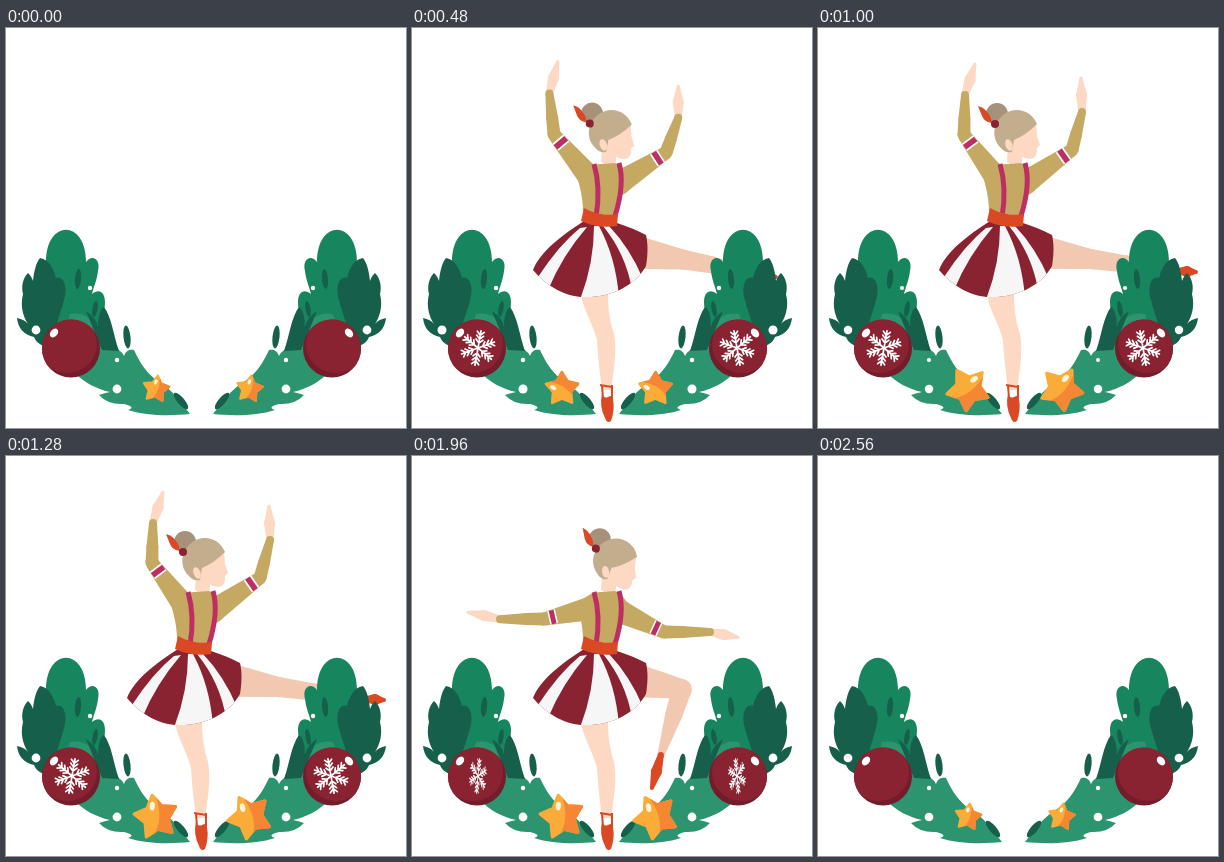
Recreate the animation shown at these times as an HTML page with a canvas. Size 400 by 400 pixels, loop 2.6 s.

```html
<!DOCTYPE html>
<html lang="en">
<head>
<meta charset="utf-8">
<title>Dancer and wreath</title>
<style>
html, body { margin: 0; width: 100%; height: 100%; overflow: hidden; background: #fff; }
canvas { display: block; width: 100vmin; height: 100vmin; }
</style>
</head>
<body>
<canvas id="stage" width="400" height="400"></canvas>
<script>
const ctx = document.getElementById('stage').getContext('2d');
const LOOP = 2600, TAU = Math.PI * 2, DEG = Math.PI / 180;
const SKIN = '#fdd8c3', SKIN_SHADE = '#f2c8b0', GOLD = '#c5a963', MAGENTA = '#bd2f62';
const RED = '#8a2331', ORANGE = '#db4924', BRIGHT = '#17855d', DARK = '#165f4a', LIGHT = '#2c9570';

const shapes = {
  bright: 'M40 234C40 191 80 191 80 234C86 226 95 231 92 243C91 252 88 258 86 266C93 260 99 264 99 274C99 284 95 292 90 300L50 310L38 262Z',
  darkLeft: 'M34 230C44 232 48 242 50 250C58 247 62 260 58 272C55 284 52 290 50 300L48 322C36 318 30 315 28 309C18 307 12 300 11 290C16 291 20 293 22 296C17 288 14 278 17 266C15 258 17 250 22 245C25 248 26 250 27 253C28 243 30 235 34 230Z',
  light: 'M64 286C85 282 92 300 100 320C108 320 114 320 118 328C120 322 124 321 128 322C134 335 141 346 152 353C166 361 176 376 184 386C165 388 140 388 122 382C128 380 126 378 118 376Q102 377 93 367Q99 365 104 364C90 361 78 354 70 346L50 335Z',
  darkRight: 'M80 283Q90 290 92 298C92 288 95 280 98 279C106 290 107 306 113 323L96 322Z',
  leg: 'M168 262C172 285 181 295 185 312C186 330 188 345 190 362L199 362C202 342 205 322 202 306C197 290 196 280 196 262Z',
  shoe: 'M190 366Q192 371 196 369Q201 366 201 371Q203 382 199 393Q195 396 193 390Q187 378 190 366Z',
  ribbons: 'M188 357L200 359M200 357L200 370M190 358L191 370',
  skirt: 'M172 193C150 207 128 224 121 242C135 259 155 269 172 269C195 270 222 260 234 238C236 226 236 215 234 207C225 202 214 198 205 195Z',
  stripes: 'M168 200Q147 217 126 249L136 262Q150 228 175 199ZM182 198Q182 237 167 274L207 270Q204 230 187 198ZM191 198Q214 226 220 262L231 251Q218 220 197 198Z',
  torso: 'M170 144Q180 135 190 136L203 135Q212 138 216 150C212 162 206 172 205 188L171 184C171 170 168 160 166 152Z',
  straps: 'M182 136Q189 160 184 189M207 135Q213 156 203 188',
  belt: 'M172 180Q188 189 206 186L205 198Q186 201 169 193Z',
  neck: 'M190 118L204 122L204 134Q197 141 189 134Z',
  face: 'M218 95L219 108L222 117L219 120Q220 130 212 131Q200 130 190 116Z',
  hair: 'M219 96C213 81 196 78 185 87C174 96 174 111 182 119C186 124 190 125 194 124L196 112Q208 107 219 96Z',
  feather: 'M160 78Q170 80 174 94Q167 95 164 88Z'
};
const paths = {};
for (const name in shapes) paths[name] = new Path2D(shapes[name]);

function fill(name, color) {
  ctx.fillStyle = color;
  ctx.fill(paths[name]);
}

function stroke(name, color, width) {
  ctx.strokeStyle = color;
  ctx.lineWidth = width;
  ctx.stroke(paths[name]);
}

function ellipse(x, y, rx, ry, color, tilt = 0) {
  ctx.fillStyle = color;
  ctx.beginPath();
  ctx.ellipse(x, y, rx, ry, tilt * DEG, 0, TAU);
  ctx.fill();
}

function layer(draw) {
  ctx.save();
  draw();
  ctx.restore();
}

// Monotone cubic through (times, values): holds stay flat, passing keys stay smooth.
function track(times, values, t) {
  const last = times.length - 1;
  if (t <= times[0]) return values[0];
  if (t >= times[last]) return values[last];
  const slope = i => (values[i + 1] - values[i]) / (times[i + 1] - times[i]);
  const tangent = i => {
    if (i === 0 || i === last) return 0;
    const a = slope(i - 1), b = slope(i);
    return a * b > 0 ? 2 * a * b / (a + b) : 0;
  };
  const i = times.findIndex(time => time > t) - 1;
  const d = times[i + 1] - times[i], u = (t - times[i]) / d, e = u * u * (3 - 2 * u);
  return values[i] * (1 - e) + values[i + 1] * e +
    d * u * (1 - u) * (tangent(i) * (1 - u) - tangent(i + 1) * u);
}

// Head tilt, then x,y of: left elbow, wrist, fingertips; the same on the right; knee, ankle, toe.
const low =     [11, 140,180, 108,204, 84,222,  250,186, 282,208, 306,224, 232,286, 218,338, 214,366];
const rising =  [4,  138,106, 122,64,  124,31,  254,132, 271,105, 274,79,  268,233, 308,250, 331,262];
const raised =  [0,  146,107, 147,67,  157,36,  254,122, 264,84,  263,50,  272,231, 360,243, 378,244];
const opening = [3,  134,123, 113,84,  106,54,  264,137, 289,105, 303,77,  278,234, 312,272, 325,298];
const spread =  [11, 132,163, 88,163,  56,156,  252,176, 298,176, 326,181, 270,233, 249,299, 240,332];
const poseTimes = [0, 280, 680, 1280, 1640, 1960, 2400];
const poses = [low, rising, raised, raised, opening, spread, low];

function limb(points, widths, color) {
  ctx.fillStyle = color;
  points.forEach(([x, y], i) => {
    const r = widths[i] / 2;
    ctx.beginPath();
    ctx.arc(x, y, r, 0, TAU);
    ctx.fill();
    if (!i) return;
    const [px, py] = points[i - 1], pr = widths[i - 1] / 2;
    const a = Math.atan2(y - py, x - px), nx = -Math.sin(a), ny = Math.cos(a);
    ctx.beginPath();
    ctx.moveTo(px + nx * pr, py + ny * pr);
    ctx.lineTo(x + nx * r, y + ny * r);
    ctx.lineTo(x - nx * r, y - ny * r);
    ctx.lineTo(px - nx * pr, py - ny * pr);
    ctx.fill();
  });
}

const mix = (a, b, u) => [a[0] + (b[0] - a[0]) * u, a[1] + (b[1] - a[1]) * u];

function band(a, b, from, to, width, color) {
  ctx.strokeStyle = color;
  ctx.lineWidth = width;
  ctx.beginPath();
  ctx.moveTo(...mix(a, b, from));
  ctx.lineTo(...mix(a, b, to));
  ctx.stroke();
}

function arm(shoulder, elbow, wrist, tip) {
  limb([wrist, mix(wrist, tip, 0.5), tip], [7, 11, 3], SKIN);
  limb([shoulder, elbow, mix(elbow, wrist, 0.4), wrist], [24, 13, 12, 8], GOLD);
  band(shoulder, elbow, 0.74, 0.9, 14, '#fff');
  band(shoulder, elbow, 0.77, 0.87, 14, MAGENTA);
}

function drawHead(tilt) {
  ctx.translate(198, 130);
  ctx.rotate(tilt * DEG);
  ctx.translate(-198, -130);
  ellipse(179, 86, 11, 11, '#a6917a');
  fill('face', SKIN);
  fill('hair', '#c2ad8d');
  ellipse(191, 117, 3.5, 6, SKIN, -20);
  fill('feather', ORANGE);
  ellipse(169, 89, 3, 6, ORANGE, -35);
  ellipse(177, 96, 4, 4, RED);
}

function drawDancer(t) {
  const turn = track([0, 280, 420, 2160, 2540], [0, 0.81, 1, 1, 0], t);
  if (turn < 0.01) return;
  const pose = low.map((_, i) => track(poseTimes, poses.map(p => p[i]), t));
  const joint = i => [pose[1 + 2 * i], pose[2 + 2 * i]];
  const knee = joint(6), ankle = joint(7), toe = joint(8);
  ctx.translate(194, 0);
  ctx.scale(turn, 1);
  ctx.translate(-194, 0);

  limb([[216, 223], knee, mix(knee, ankle, 0.4), ankle], [36, 20, 17, 7], SKIN_SHADE);
  limb([ankle, mix(ankle, toe, 0.5), toe], [6, 11, 4], ORANGE);
  fill('leg', SKIN);
  fill('shoe', ORANGE);
  stroke('ribbons', ORANGE, 2);

  layer(() => {
    fill('skirt', RED);
    ctx.clip(paths.skirt);
    fill('stripes', '#f7f6f6');
  });
  fill('neck', SKIN);
  arm([180, 152], joint(0), joint(1), joint(2));
  arm([207, 155], joint(3), joint(4), joint(5));
  fill('torso', GOLD);
  stroke('straps', MAGENTA, 5);
  fill('belt', ORANGE);
  layer(() => drawHead(pose[0]));
}

function drawFlake(width) {
  if (width < 0.01) return;
  ctx.translate(66, 320);
  ctx.scale(width, 1);
  ctx.rotate(10 * DEG);
  ctx.strokeStyle = '#fff';
  ctx.lineWidth = 1.7;
  ctx.lineCap = 'round';
  for (let i = 0; i < 6; i++) {
    ctx.beginPath();
    ctx.moveTo(0, 0);
    ctx.lineTo(0, -17.5);
    for (const y of [-5, -9, -13]) {
      ctx.moveTo(-3.5, y - 3.5);
      ctx.lineTo(0, y);
      ctx.lineTo(3.5, y - 3.5);
    }
    ctx.stroke();
    ctx.rotate(TAU / 6);
  }
}

function drawBall(flakeWidth) {
  ellipse(65, 320.5, 29, 29, '#751c2b');
  layer(() => {
    ctx.beginPath();
    ctx.arc(65, 320.5, 29, 0, TAU);
    ctx.clip();
    ellipse(61, 316, 30, 29, RED);
  });
  layer(() => drawFlake(flakeWidth));
  ellipse(48, 305, 3.5, 5, '#fff', 40);
}

function drawWreathSide(flakeWidth, glow) {
  fill('bright', BRIGHT);
  fill('light', LIGHT);
  fill('darkLeft', DARK);
  fill('darkRight', DARK);
  ellipse(72, 251, 3, 10, DARK, 5);
  ellipse(89, 281, 2.5, 8, DARK, 10);
  ellipse(121, 309, 3.5, 11.5, DARK, -6);
  ellipse(175, 373, 3.5, 10.5, DARK, -40);
  drawBall(flakeWidth);
  for (const [x, y, r] of [[30, 302, 4.4], [84, 260, 2.2], [111, 361, 4.4], [111, 332, 2.2]])
    ellipse(x, y, r * glow, r * glow, '#fff');
}

function drawStar(x, radius, angle) {
  ctx.translate(x, 361);
  ctx.rotate(angle * DEG);
  ctx.scale(radius, radius);
  const star = new Path2D();
  for (let i = 0; i < 10; i++) {
    const r = i % 2 ? 0.56 : 1, a = i * TAU / 10;
    star.lineTo(r * Math.sin(a), -r * Math.cos(a));
  }
  star.closePath();
  const paint = color => {
    ctx.fillStyle = ctx.strokeStyle = color;
    ctx.fill(star);
    ctx.stroke(star);
  };
  ctx.lineJoin = 'round';
  ctx.lineWidth = 0.15;
  paint('#fbab38');
  layer(() => {
    ctx.clip(new Path2D('M.1 -1.2H1.2V1.2H-.7Q.5 .4 .1 -1.2Z'));
    paint('#f58634');
  });
  ellipse(-0.08, -0.52, 0.12, 0.2, '#fff3dc', 15);
}

function drawStars(t) {
  const times = [0, 280, 720, 1200, 2020, 2520];
  const radius = track(times, [13.5, 14.5, 20, 22, 22, 13.5], t);
  const spin = rest => track(times, [8, -10, -183, rest, rest, 8], t);
  layer(() => drawStar(150, radius, spin(-370)));
  layer(() => drawStar(243.5, radius, spin(-388)));
}

function frame(now) {
  const t = now % LOOP;
  const flakeWidth = track([0, 240, 1680, 1960, 2240], [0, 1, 1, 0.5, 0], t);
  const glow = 1 + 0.04 * Math.sin(t / LOOP * TAU * 2);
  ctx.clearRect(0, 0, 400, 400);
  layer(() => drawDancer(t));
  drawWreathSide(flakeWidth, glow);
  layer(() => {
    ctx.translate(391, 0);
    ctx.scale(-1, 1);
    drawWreathSide(flakeWidth, glow);
  });
  drawStars(t);
  requestAnimationFrame(frame);
}
requestAnimationFrame(frame);
</script>
</body>
</html>
```
